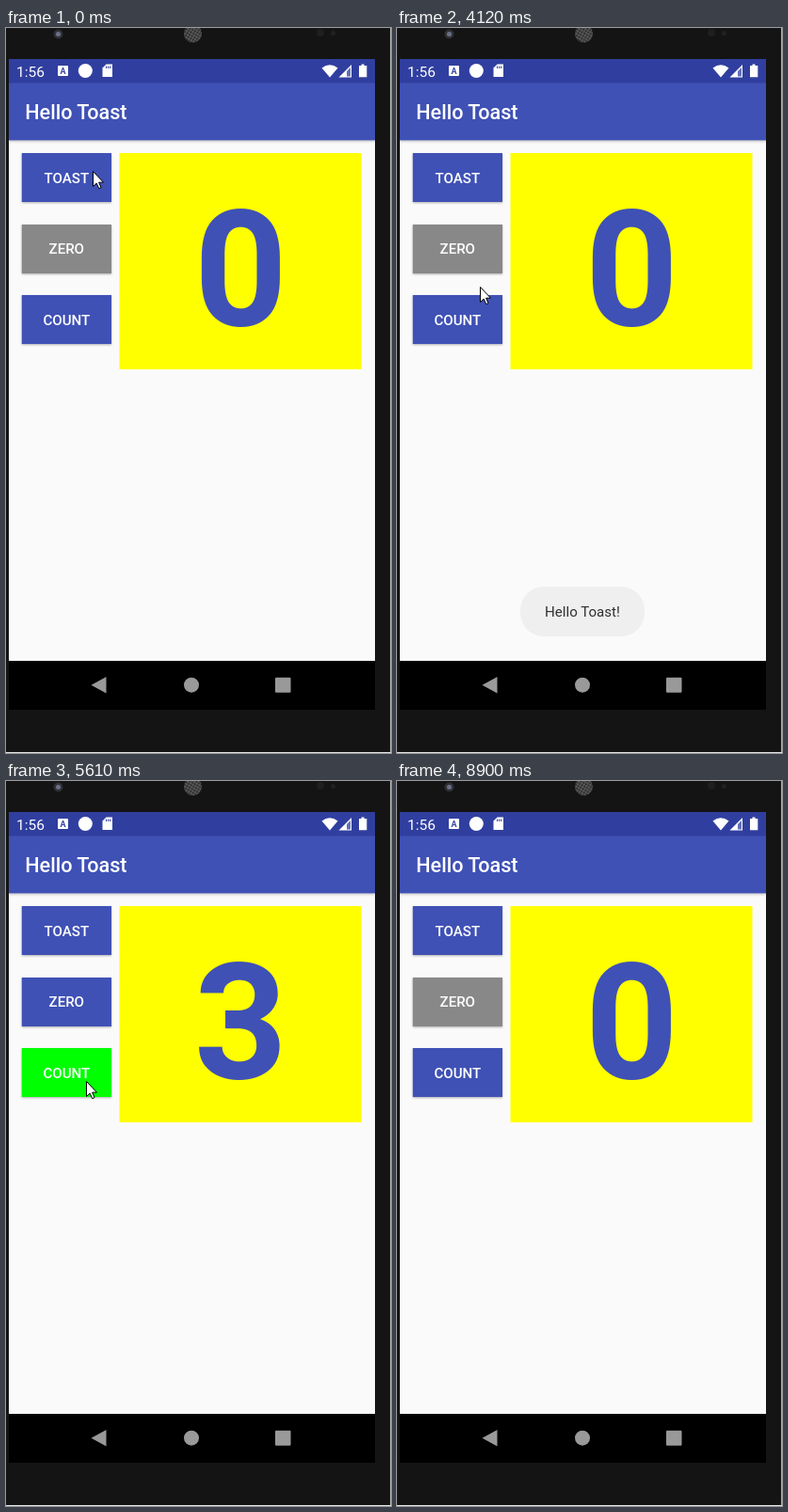
An HTML page for the animation above (9150 ms loop, 409x771 px).

```html
<!DOCTYPE html>
<html lang="en">
<head>
<meta charset="utf-8">
<title>Hello Toast</title>
<style>
html, body { margin: 0; width: 100%; height: 100%; overflow: hidden; background: #141414; }
svg { display: block; width: 409px; height: 771px; font-family: Roboto, sans-serif; }
.button rect { filter: drop-shadow(0 1px 1.3px rgba(0, 0, 0, .3)); }
.button text { font-size: 15.1px; font-weight: 500; fill: #fff; }
.bar { filter: drop-shadow(0 1px 1.5px rgba(0, 0, 0, .25)); }
.mid { text-anchor: middle; }
</style>
</head>
<body>
<svg viewBox="0 0 409 771">
  <defs>
    <pattern id="mesh" width="3" height="3" patternUnits="userSpaceOnUse" patternTransform="rotate(30)">
      <rect width="3" height="3" fill="#5c5c5c"/>
      <circle cx="1.5" cy="1.5" r="1" fill="#161616"/>
    </pattern>
  </defs>

  <!-- phone body -->
  <rect width="409" height="771" fill="#141414"/>
  <path d="M408.5 0V771" stroke="#a8a8a8"/>
  <path d="M0 770.5H409" stroke="#e4e4e4"/>
  <circle cx="55.5" cy="6.5" r="5" fill="#303036"/>
  <circle cx="55.5" cy="6.5" r="2.5" fill="#6c7088"/>
  <circle cx="198.5" cy="6" r="9.5" fill="url(#mesh)"/>
  <circle cx="334" cy="5" r="4" fill="#1f1f1f"/>
  <circle cx="347.5" cy="5.5" r="2.5" fill="#212121"/>

  <!-- screen -->
  <rect x="3" y="119" width="389" height="554" fill="#fafafa"/>
  <rect class="bar" x="3" y="58" width="389" height="61.4" fill="#3f51b5"/>
  <rect x="3" y="33" width="389" height="25.5" fill="#303f9f"/>
  <path d="M0 33H3V128H0ZM392 33H397V128H392Z" fill="#141414"/>

  <!-- status bar -->
  <g fill="#fff">
    <text x="11" y="51.5" font-size="15.5">1:56</text>
    <rect x="55" y="40" width="11" height="11" rx="1"/>
    <text class="mid" x="60.5" y="48.8" font-size="9" font-weight="700" fill="#303f9f">A</text>
    <circle cx="84.3" cy="45.5" r="7.5"/>
    <path d="M106.5 38.5H113V52H102.5V42.5Z"/>
    <path d="M106 41.7H112" stroke="#303f9f" stroke-width="2.5" stroke-dasharray="1"/>
    <path d="M335.5 42.5Q344 36 352.5 42.5L344 52.5Z"/>
    <path d="M367 39V52.5H353.5Z"/>
    <path d="M366 42V51.5H362V46Z" fill="#303f9f" opacity=".75"/>
    <path d="M377.5 38.5h3V40h2.8V52.3H375V40h2.5Z"/>
    <text x="20.2" y="97" font-size="21.6" font-weight="500">Hello Toast</text>
  </g>

  <g id="buttons"></g>
  <rect x="120.5" y="133" width="257" height="230" fill="#ff0"/>
  <text id="digit" class="mid" x="249.3" y="316" font-size="173" font-weight="700" fill="#3f51b5">0</text>

  <g id="toast">
    <rect x="131" y="594" width="132" height="53" rx="25" fill="#efefef"/>
    <text class="mid" x="197" y="626" font-size="15.1" fill="#303030">Hello Toast!</text>
  </g>

  <!-- navigation bar -->
  <rect x="3" y="673" width="389" height="52" fill="#000"/>
  <g fill="#999">
    <path d="M90.5 698.7L106.5 690V707.5Z"/>
    <circle cx="197" cy="698.7" r="8"/>
    <rect x="286" y="690.7" width="16.5" height="16" rx="1"/>
  </g>

  <path id="cursor" d="M.5.5V16.5L4.2 13.1 6.7 18.7 9 17.7 6.6 12.2H11.5Z" fill="#fff" stroke="#000"/>
</svg>
<script>
const LOOP = 9150, FRAME = 140;
const BLUE = '#3f51b5', GREY = '#888', GREEN = '#0f0';
const $ = id => document.getElementById(id);

$('buttons').innerHTML = ['TOAST', 'ZERO', 'COUNT'].map((label, i) => {
  const y = 133 + i * 75.6;
  return `<g class="button">
    <rect x="16.8" y="${Math.round(y)}" width="95.2" height="52" fill="${BLUE}"/>
    <text class="mid" x="64.3" y="${Math.floor(y + 32)}">${label}</text></g>`;
}).join('');
const [, zero, count] = document.querySelectorAll('.button rect');

// Progress from 0 to 1, moving once per frame; the first step falls on start
function progress(t, start, end) {
  if (t < start) return 0;
  if (t >= end) return 1;
  const gaps = Math.round((end - start) / FRAME);
  return (1 + Math.floor((t - start) / (end - start) * gaps)) / (gaps + 1);
}
const smooth = p => p * p * (3 - 2 * p);
const easeOut = p => Math.sin(p * Math.PI / 2);

// Cursor legs: start, end, x, y
const legs = [
  [2470, 2920, 90, 231],
  [3850, 4270, 85, 319],
  [5880, 6310, 79, 241],
  [7020, 7310, 100, 173],
  [7460, 8050, 364, 721],
  [8200, 8470, 362, 759]
];

function cursorAt(t) {
  return legs.reduce(([x, y], [start, end, toX, toY]) => {
    const p = smooth(progress(t, start, end));
    return [x + (toX - x) * p, y + (toY - y) * p];
  }, [92, 152]).map(Math.round);
}

function draw(now) {
  const t = now % LOOP;
  const counting = t >= 4540 && t < 6450;
  const n = counting ? Math.min(3, 1 + Math.floor((t - 4540) / 535)) : 0;
  $('digit').textContent = n;
  zero.setAttribute('fill', n ? BLUE : GREY);
  count.setAttribute('fill', n % 2 ? GREEN : BLUE);
  $('toast').setAttribute('opacity',
    easeOut(progress(t, 1710, 1980)) - easeOut(progress(t, 4930, 5210)));
  $('cursor').setAttribute('transform', `translate(${cursorAt(t)})`);
  $('cursor').setAttribute('opacity', t < 8900 ? 1 : 0);
}

let origin;
function tick(now) {
  origin ??= now;
  draw(now - origin);
  requestAnimationFrame(tick);
}
draw(0);
requestAnimationFrame(tick);
</script>
</body>
</html>
```
